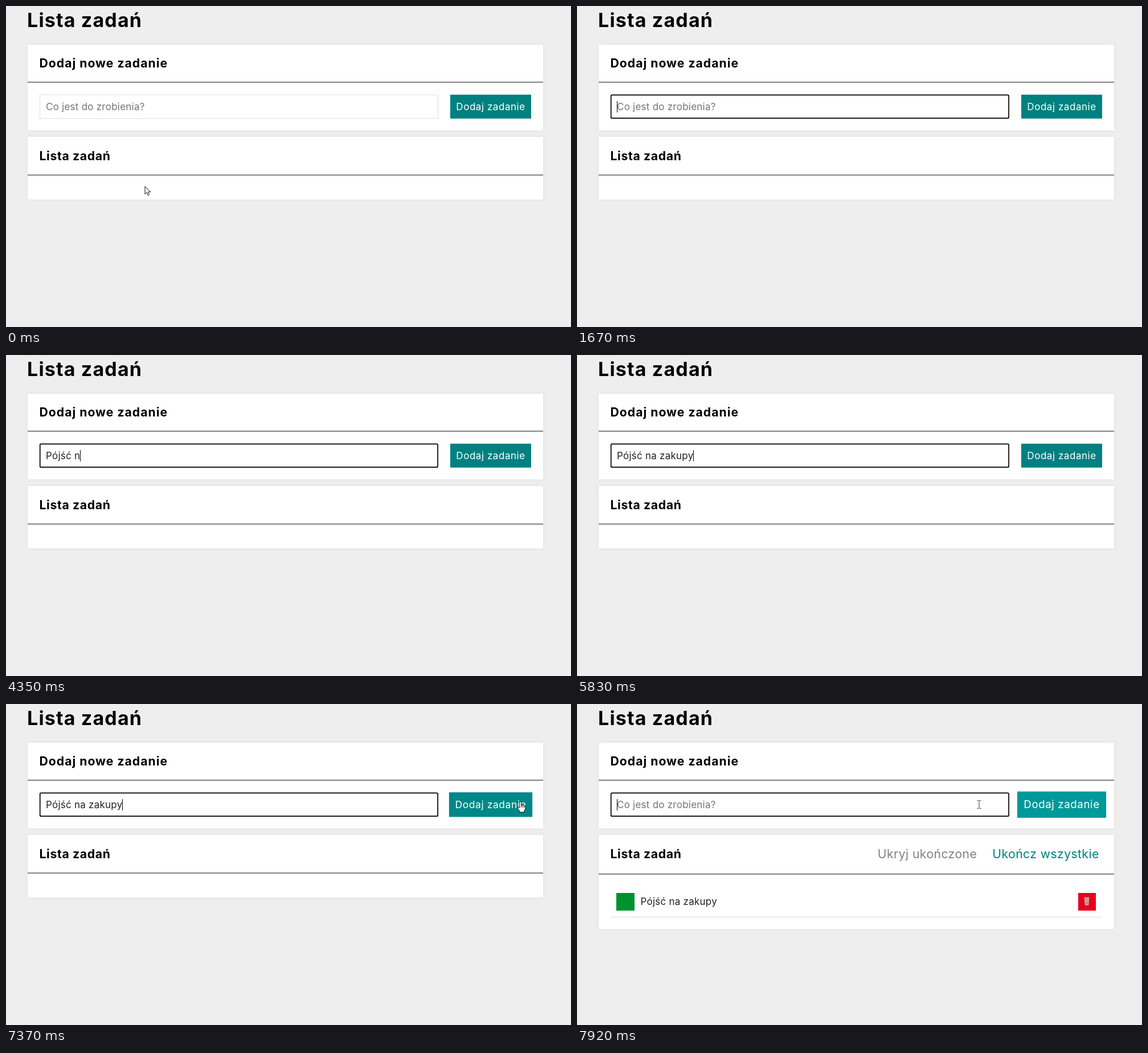
Animation of 992 by 564 pixels, one loop 7.99 s. Source, as an HTML page:

```html
<!DOCTYPE html>
<html lang="pl">
<head>
<meta charset="utf-8">
<title>Lista zadań</title>
<style>
  html, body { margin: 0; width: 100%; height: 100%; overflow: hidden; background: #eee; }
  svg { display: block; width: 992px; height: 564px; }
  text { font: 17px Inter, sans-serif; letter-spacing: .014em; white-space: pre; }
  .title { font-size: 34px; font-weight: 700; letter-spacing: .034em; }
  .head { font-size: 21.2px; font-weight: 700; letter-spacing: .03em; }
  .form { letter-spacing: .047em; }
  .link { font-size: 21.2px; letter-spacing: .019em; text-anchor: middle; }
  .label { letter-spacing: .032em; text-anchor: middle; }
  .card { fill: #fff; filter: drop-shadow(0 0 2px #ddd); }
  .rule { fill: #505050; }
  .cursor { fill: #fff; stroke: #111; stroke-width: 1; stroke-linejoin: round; }
</style>
</head>
<body>
<svg viewBox="0 0 992 564">
  <rect width="992" height="564" fill="#eee"/>
  <text class="title" x="37" y="37">Lista zadań</text>

  <rect class="card" x="38" y="68" width="905" height="150.5"/>
  <text class="head form" x="58.5" y="108">Dodaj nowe zadanie</text>
  <rect class="rule" x="38" y="133.1" width="905" height="1.4"/>
  <rect id="field" fill="#fff"/>
  <text id="value" x="70" y="183"></text>
  <rect id="caret" y="167" width="1" height="20"/>
  <g id="button">
    <rect id="face" x="-71" y="-21" width="142" height="42"/>
    <text class="label" y="6" fill="#fff">Dodaj zadanie</text>
  </g>

  <rect id="list" class="card" x="38" y="230" width="905"/>
  <text class="head" x="58.5" y="270.5">Lista zadań</text>
  <rect id="listRule" class="rule" x="38" width="905" height="1.4"/>
  <g id="item">
    <text class="link" x="615" y="271" fill="#808080">Ukryj ukończone</text>
    <text class="link" x="823" y="271" fill="#008080">Ukończ wszystkie</text>
    <rect x="69" y="332" width="32" height="31" fill="#00922f"/>
    <text x="111.5" y="353" fill="#222">Pójść na zakupy</text>
    <rect x="880" y="332" width="31" height="31" fill="#e8001f"/>
    <path d="M891 342.5h8l-.9 11h-6.2z" fill="#e3d3c4"/>
    <path d="M890.3 341.5h9.4M893 343.5l.4 9M895 343.5v9M897 343.5l-.4 9" stroke="#77584c" stroke-width=".8"/>
    <rect x="890.5" y="340" width="9" height="1.4" fill="#f1e6da"/>
    <rect x="59" y="374" width="863" height="1" fill="#ddd"/>
  </g>

  <g id="pointer">
    <path id="arrow" class="cursor" d="M0 0V13.4L3.1 10.6 5.4 15.6 7.6 14.6 5.4 9.8H9.7Z"/>
    <path id="beam" d="M-3.5-6.5h2.5l1 1 1-1h2.5M0-5.5v12M-3.5 7.5h2.5l1-1 1 1h2.5" fill="none" stroke="#333"/>
    <path id="hand" class="cursor" d="M-1.5 1.5Q0-1 1.5 1.5V7Q3 5.2 4.3 7 6 5.7 7 7.6 9 7 9 9.5V13L7 16.5V19H-1.5V17L-5 11.5Q-4.8 9.3-2.8 10.3L-1.5 12ZM1.5 7v4M4.3 7v4M7 7.6V11"/>
    <circle id="click" r="12.8" fill="rgb(255,245,0)" fill-opacity=".5"/>
  </g>
</svg>
<script>
const $ = id => document.getElementById(id);
const LOOP = 7990, STEP = 70, PHRASE = 'Pójść na zakupy';
const HOVER = 7270, PRESS = 7500, ADDED = 7710, FOCUS = 570;
const keys = [2160, 2680, 2960, 3300, 3560, 3830, 4350, 4490, 4620, 4770, 5040, 5170, 5310, 5640, 5830];
// pointer paths: time, x, y
const entry = [[0, 244, 317], [80, 246, 312], [360, 258, 230], [500, 261, 180], [640, 261, 179], [720, 252, 258], [800, 305, 260]];
const exit = [[6690, 974, 548], [6900, 965, 400], [7100, 945, 240], [7200, 936, 168], [7270, 918, 168],
  [7360, 903, 171], [7500, 894, 170], [7640, 894, 171], [7710, 890, 173], [7780, 870, 175], [7850, 800, 176], [7920, 706, 176]];

const within = (t, a, b) => t >= a && t < b;
const show = (id, on) => $(id).setAttribute('visibility', on ? 'visible' : 'hidden');
const set = (id, attrs) => { for (const k in attrs) $(id).setAttribute(k, attrs[k]); };

// CSS "ease" curve, solved by bisection
function ease(p) {
  if (p <= 0 || p >= 1) return p <= 0 ? 0 : 1;
  const curve = (s, a, b) => 3 * a * s * (1 - s) ** 2 + 3 * b * s * s * (1 - s) + s ** 3;
  let lo = 0, hi = 1;
  for (let i = 0; i < 20; i++) {
    const mid = (lo + hi) / 2;
    if (curve(mid, .25, .25) < p) lo = mid; else hi = mid;
  }
  return curve(lo, .1, 1);
}

function along(path, t) {
  const i = path.findIndex(p => p[0] > t);
  if (i <= 0) return (i ? path[path.length - 1] : path[0]).slice(1);
  const [t0, x0, y0] = path[i - 1], [t1, x1, y1] = path[i], k = (t - t0) / (t1 - t0);
  return [x0 + (x1 - x0) * k, y0 + (y1 - y0) * k];
}

function drawField(t) {
  const added = t >= ADDED;
  const focused = within(t, FOCUS, PRESS) || added;
  const typed = added ? '' : PHRASE.slice(0, keys.filter(k => k <= t).length);
  const value = $('value');
  value.textContent = typed;
  const end = typed ? value.getComputedTextLength() : 0;
  value.textContent = typed || 'Co jest do zrobienia?';
  value.setAttribute('fill', typed ? '#222' : '#757575');
  set('caret', { x: Math.round(69.8 + end) });
  show('caret', focused && !within(t, 1140, 1670) && !within(t, 6310, 6840));
  set('field', focused
    ? { x: 59.7, y: 156.3, width: 698.4, height: 40.9, rx: 2, stroke: '#000', 'stroke-width': 1.7 }
    : { x: 59.5, y: 156, width: 699, height: 41.5, rx: 0, stroke: '#ddd', 'stroke-width': 1 });
}

function drawButton(t) {
  const k = ease((t - HOVER) / 500), c = 128 + 25 * k;
  set('button', { transform: `translate(851 176.8) scale(${1 + .1 * k})` });
  set('face', { fill: `rgb(0,${c},${c})` });
}

function drawList(t) {
  const added = t >= ADDED;
  set('list', { height: added ? 165.5 : 110 });
  set('listRule', { y: added ? 298 : 296.3 });
  show('item', added);
}

function drawPointer(t) {
  const tick = Math.max(0, Math.floor((t - 10) / STEP) * STEP + 10);
  const [x, y] = along(t < 3000 ? entry : exit, tick);
  const visible = t < 880 || t >= 6690;
  const inRow = within(y, 156, 198);
  const beam = inRow && within(x, 59, 759), hand = inRow && within(x, 778, 924);
  set('pointer', { transform: `translate(${x} ${y})` });
  show('arrow', visible && !beam && !hand);
  show('beam', visible && beam);
  show('hand', visible && hand);
  show('click', within(t, FOCUS, 710) || within(t, PRESS, ADDED));
}

const start = performance.now();
function frame() {
  const t = (performance.now() - start) % LOOP;
  drawField(t);
  drawButton(t);
  drawList(t);
  drawPointer(t);
  requestAnimationFrame(frame);
}
frame();
</script>
</body>
</html>
```
